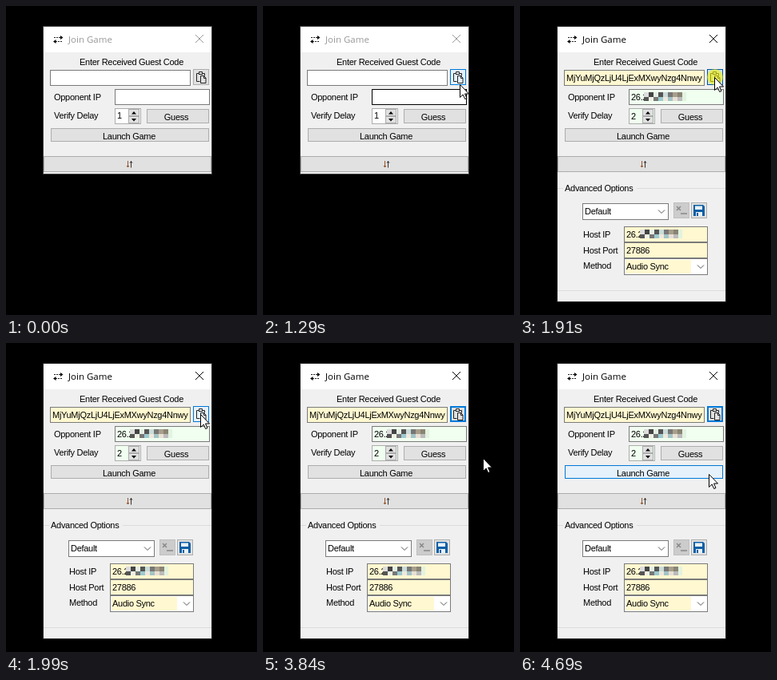
These frames come from a looping animation (314x387 px, 6.17 s). An HTML page:

```html
<!DOCTYPE html>
<html lang="en">
<head>
<meta charset="utf-8">
<title>Join Game dialog</title>
<style>
html, body { margin: 0; width: 100%; height: 100%; overflow: hidden; background: #000; }
svg { display: block; width: 314px; height: 387px; }
text { font: 11px "Liberation Sans", Arial, sans-serif; letter-spacing: -.28px; white-space: pre; }
.mid { text-anchor: middle; }
.title { font: 11.5px "Open Sans", "Noto Sans", sans-serif; letter-spacing: 0; fill: #999; }
rect { shape-rendering: crispEdges; }
.box { transform: translate(.5px, .5px); fill: #fff; stroke: #7a7a7a; }
.button { fill: #e1e1e1; stroke: #adadad; }
.line { fill: none; stroke: #222; }
.close { stroke: #999; }
.frame { fill: #f0f0f0; stroke: #404040; }
.yellow { fill: #fff8d0; }

.active .title { fill: #000; }
.active .close { stroke: #000; }
.active .frame { stroke: #222; }
.open .code { fill: #fff8d0; }
.open .ip, .open .delay { fill: #f0fff0; }
svg:not(.open) .opened, .open .closed, svg:not(.press) .spot { display: none; }
.ipHover .ip { stroke: #000; }
.pasteHover .paste { fill: #e5f1fb; stroke: #0078d7; }
.press .paste { fill: #cce4f7; stroke: #005499; }
svg:not(.focus) .ring { display: none; }
.launchHover .launch { fill: #e5f1fb; stroke: #0078d7; }
</style>
</head>
<body>
<svg viewBox="0 0 314 387">
  <rect class="box frame closed" x="46" y="25" width="211" height="185"/>
  <rect class="box frame opened" x="46" y="25" width="211" height="345"/>
  <rect x="47" y="26" width="210" height="32" fill="#fff"/>
  <path class="line" stroke="#000" d="M60 39.5h2m1 0h2m1 0h4M60 44.5h4m1 0h2m1 0h2"/>
  <path d="M68 37l3.5 2.5L68 42zM62.500 42L59 44.500l3.500 2.500z"/>
  <text class="title" x="78" y="46">Join Game</text>
  <path class="line close" d="M237 36l10 10m0-10l-10 10"/>

  <text class="mid" x="157" y="74">Enter Received Guest Code</text>
  <rect class="box code" x="55" y="80" width="175" height="19"/>
  <text class="opened" x="58" y="94">MjYuMjQzLjU4LjExMXwyNzg4Nnwy</text>
  <rect class="box button paste" x="234" y="79" width="19" height="19"/>
  <rect class="ring" x="235" y="80" width="18" height="18" fill="none" stroke="#0078d7" stroke-width="2"/>
  <path class="line" d="M242.500 94.500h-4v-10h3v-2h4v2h3v3M241 85.500h5M243.500 87.500h4l2.500 2.500v6.500h-6.500zM247.500 87.500v3h2.500"/>
  <circle class="spot" cx="244" cy="89" r="10" fill="#f4f000" opacity=".6"/>

  <text x="60" y="118">Opponent IP</text>
  <rect class="box ip" x="136" y="104" width="118" height="19"/>
  <text class="opened" x="139" y="118">26.2</text>
  <g class="opened mosaic" transform="translate(155 108)"></g>

  <text x="60" y="141">Verify Delay</text>
  <rect class="box delay" x="136" y="128" width="32" height="19" style="stroke:#adadad"/>
  <text class="closed" x="139" y="141">1</text>
  <text class="opened" x="139" y="142">2</text>
  <rect class="box button" x="153" y="129" width="13" height="8"/>
  <rect class="box button" x="153" y="138" width="13" height="8"/>
  <path d="M157 135.500l3-3.500 3 3.500zM157 141l3 3.500 3-3.500z"/>
  <rect class="box button" x="176" y="129" width="77" height="17"/>
  <text class="mid" x="213" y="143">Guess</text>
  <rect class="box button launch" x="56" y="153" width="197" height="16"/>
  <text class="mid" x="154" y="167">Launch Game</text>
  <rect class="box button" x="47" y="188" width="209" height="19"/>
  <path class="line" stroke-width=".9" d="M156.500 202.500v-8m-1.500 2l1.500-2 1.500 2"/>
  <path class="line" style="stroke:#96552c" d="M152.500 194v8m-1.500-2l1.500 2 1.500-2"/>

  <g class="opened">
    <path class="line" style="stroke:#dcdcdc" d="M47 228.500h7M146 228.500h111M47 356.500h210"/>
    <text x="56" y="232">Advanced Options</text>
    <rect class="box" x="78" y="247" width="107" height="20"/>
    <text x="81" y="261">Default</text>
    <path class="line" style="stroke:#555" d="M173 255.500l4 4 4-4"/>
    <rect class="box button" x="192" y="246" width="19" height="19" style="fill:#ccc;stroke:#bfbfbf"/>
    <path class="line" style="stroke:#888" stroke-width="1.500" d="M196 251l5 5m0-5l-5 5M201 260h8"/>
    <rect class="box button" x="214" y="246" width="19" height="19"/>
    <path fill="#0b5fa5" d="M217 249h12l2 2v12h-14z"/>
    <path fill="#e8f1f8" d="M219 250.500h9v4.500h-9zM220 258h8v5h-8z"/>
    <path fill="#0b5fa5" d="M221 259h2v4h-2z"/>

    <text x="79" y="290">Host IP</text>
    <rect class="box yellow" x="130" y="276" width="104" height="19"/>
    <text x="133" y="290">26.2</text>
    <g class="mosaic" transform="translate(150 280)"></g>
    <text x="79" y="310">Host Port</text>
    <rect class="box yellow" x="130" y="296" width="104" height="19"/>
    <text x="133" y="310">27886</text>
    <text x="79" y="329">Method</text>
    <rect class="box" x="130" y="316" width="104" height="20"/>
    <rect class="yellow" x="132" y="318" width="82" height="17"/>
    <text x="133" y="330">Audio Sync</text>
    <path class="line" style="stroke:#555" d="M222 324.500l4 4 4-4"/>
  </g>

  <path class="cursor" fill="#fff" stroke="#000" d="M.5.5v16l3.700-3.500 2.500 5.500 2.300-1-2.500-5.500h5z"/>
</svg>
<script>
const LOOP = 6170;
const svg = document.querySelector('svg');
const cursor = document.querySelector('.cursor');

// Censored digits: two rows of coarse cells
const cells = [
  ['#ddd', '#444', '#e4efe4', '#555', '#c9dcd8', '#777', '#a89f8c', '#8a8474', '#e2f3df'],
  ['#555', '#eef2e4', '#777', '#9ccbd0', '#efe8dc', '#a3c4c6', '#e9dfd4', '#bbb', '#e2f3df'],
];
for (const group of document.querySelectorAll('.mosaic')) {
  group.innerHTML = cells.map((row, y) => row.map((color, x) =>
    `<rect x="${x * 6}" y="${y * 6}" width="${x < 8 ? 6 : 5}" height="${y ? 5 : 6}" fill="${color}"/>`
  ).join('')).join('');
}

// Pointer paths: start time, step length, then [step, x, y] waypoints
const paths = [
  { start: 680, step: 76.2, points: [[0, 302, 193], [3, 278, 152], [6, 253, 112], [8, 246, 98], [9, 245, 94], [10, 243, 89]] },
  { start: 3300, step: 76.8, points: [[0, 243, 92], [3, 250, 104], [6, 270, 137], [7, 275, 144], [8, 276, 147],
    [11, 269, 166], [13, 256, 173], [15, 245, 170], [16, 241, 167], [17, 238, 165], [18, 236, 164]] },
];

// Time spans in which each state applies
const states = {
  active: [1760, LOOP],
  open: [1910, LOOP],
  press: [1760, 1990],
  ipHover: [1130, 1600],
  pasteHover: [1210, 3530],
  focus: [3530, LOOP],
  launchHover: [4450, LOOP],
};

function pointerAt(time) {
  const { start, step, points } = paths[time < paths[1].start ? 0 : 1];
  const n = Math.floor((time - start) / step);
  const next = points.findIndex(p => p[0] > n);
  if (next < 0) return points.at(-1).slice(1);
  const a = points[next - 1], b = points[next];
  const k = (n - a[0]) / (b[0] - a[0]);
  return [1, 2].map(i => Math.round(a[i] + (b[i] - a[i]) * k));
}

function draw(now) {
  const time = now % LOOP;
  for (const [name, [from, to]] of Object.entries(states)) {
    svg.classList.toggle(name, time >= from && time < to);
  }
  const visible = time >= paths[0].start;
  cursor.style.display = visible ? '' : 'none';
  if (visible) cursor.setAttribute('transform', `translate(${pointerAt(time)})`);
  requestAnimationFrame(draw);
}
draw(performance.now());
</script>
</body>
</html>
```
